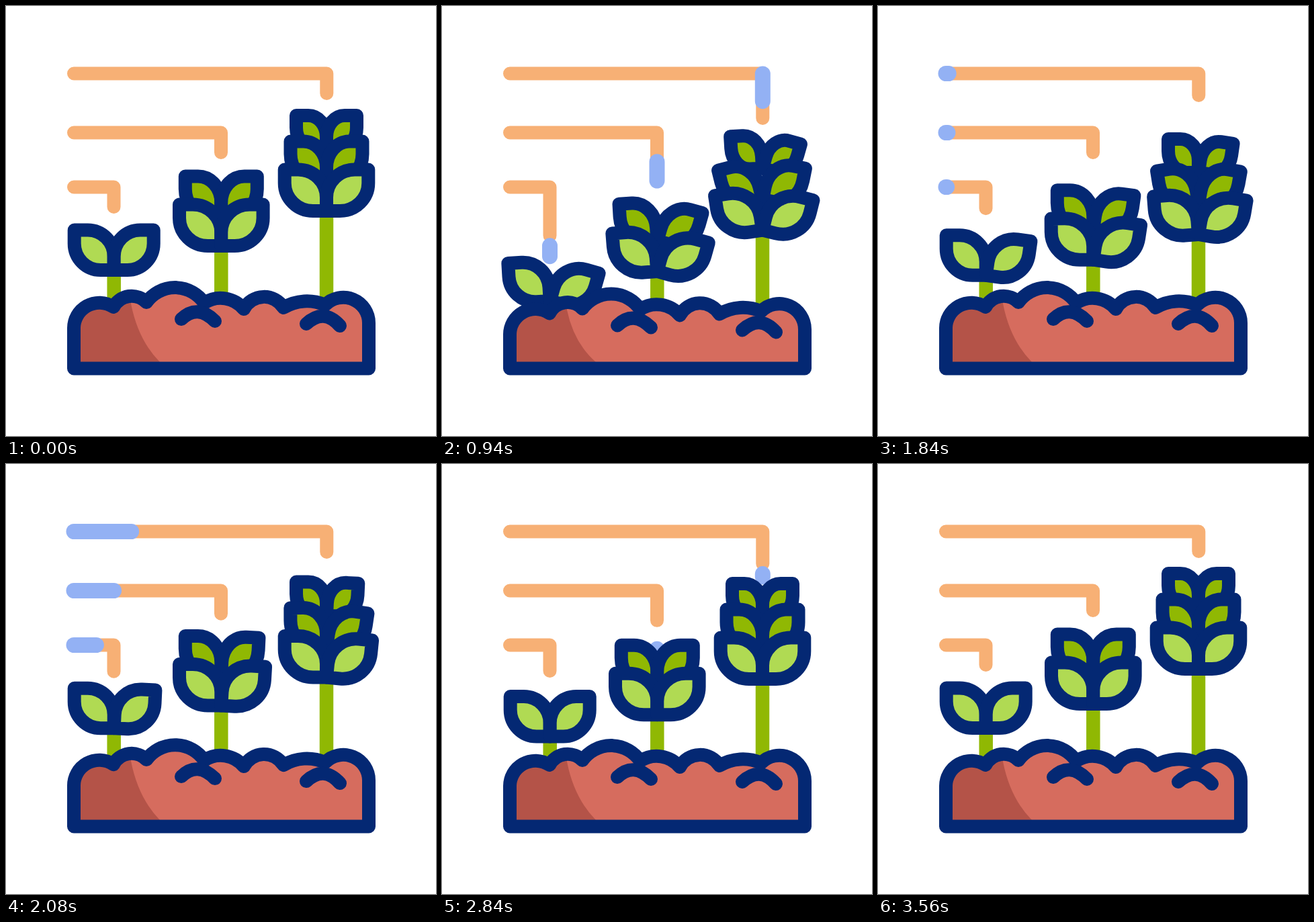
Animation of 640x640 px, one loop 3600 ms. Source, as an HTML page:

```html
<!DOCTYPE html>
<html lang="en">
<head>
<meta charset="utf-8">
<title>Growing plants</title>
<style>
  html, body { margin: 0; width: 100%; height: 100%; overflow: hidden; background: #fff; }
  svg { display: block; width: 640px; height: 640px; }
  path { fill: none; stroke-width: 20; stroke-linecap: round; stroke-linejoin: round; }
  .pipe { stroke: #f7b075; }
  .flow { stroke: #93b1f4; stroke-width: 23; }
  .stem { stroke: #90b803; stroke-width: 20.5; stroke-linecap: butt; }
  .leaf, .line { stroke: #042873; }
  .earth { fill: #d66c5e; }
  .shade { fill: #b45348; }
</style>
</head>
<body>
<svg viewBox="0 0 640 640">
  <g id="pipes"></g>
  <g id="plants"></g>
  <g id="soil"></g>
</svg>
<script>
const LOOP = 3600, LAP = 1750;
const LIGHT = '#b0da53', DARK = '#90b803';

// [time, value] pairs, eased between neighbours
const SINK = [[0, 0], [1220, 53], [2040, 0], [2650, 16.5], [3250, 0]];
const REACH = [[0, 0], [860, 44], [1670, 0], [2480, 19], [3180, 0]];
const LEFT = [[0, 0], [560, -16], [1100, 0], [1580, -9], [1840, 0]];
const RIGHT = [[100, 0], [1000, 16], [1700, 9.5], [2250, 0.7], [2600, 0]];
const PRESS = [[300, 0], [1100, 10.5], [1840, 0], [2360, -2], [2840, 0]];
const HEAD = [[30, 0], [1100, 1]];
const TAIL = [[330, 0], [1140, 1]];

// corner, resting end and length of the flow
const PIPES = [
  { x: 160.5, y: 269.5, end: 299, len: 173, delay: 0 },
  { x: 320, y: 188.5, end: 218, len: 309, delay: 150 },
  { x: 477.3, y: 100.5, end: 130, len: 444, delay: 300 }
];

// layers, back to front: [base y, width, height, flat edge, fill, delay]
const PLANTS = [
  { x: 160.7, delay: 0, layers: [[393, 59, 59.5, 20, LIGHT, 0]] },
  { x: 320.3, delay: 150, layers: [
    [311.5, 53.5, 58, 19, DARK, 0],
    [357, 62.3, 61.5, 20, LIGHT, 30]] },
  { x: 477, delay: 300, layers: [
    [213, 45, 50, 18, DARK, 0],
    [259.5, 53.5, 58, 19, DARK, 260],
    [305, 62.3, 61.5, 20, LIGHT, 130]] }
];

// soil bumps from left to right: [radius, dx, dy]
const BUMPS = [[38, 59, -33], [30.6, 49, -7], [52.5, 86, 1], [45, 59, 9],
  [34, 59, -2], [68, 62, -4], [38, 65, 27]];
const FLOOR = 539.5;

const byId = id => document.getElementById(id);

function add(parent, cls, d = '') {
  const p = document.createElementNS('http://www.w3.org/2000/svg', 'path');
  p.setAttribute('class', cls);
  p.setAttribute('d', d);
  return parent.appendChild(p);
}

function ease(keys, t) {
  if (t <= keys[0][0]) return keys[0][1];
  for (let i = 1; i < keys.length; i++) {
    const [t0, a] = keys[i - 1], [t1, b] = keys[i];
    if (t < t1) {
      const x = (t - t0) / (t1 - t0);
      return a + (b - a) * x * x * (3 - 2 * x);
    }
  }
  return keys[keys.length - 1][1];
}

function leafPath(w, h, f) {
  const arc = `A${w - f} ${h - f} 0 0 1 `;
  return `M${-w} ${-h}H${f - w}${arc}0 ${-f}V0H${-f}${arc}${-w} ${f - h}Z`;
}

for (const p of PIPES) {
  p.line = add(byId('pipes'), 'pipe');
  p.flow = add(byId('pipes'), 'flow', `M101 ${p.y}H${p.x}V${p.y + p.len - (p.x - 101)}`);
}

for (const p of PLANTS) {
  p.stem = add(byId('plants'), 'stem');
  p.leaves = [];
  for (const [y, w, h, flat, fill, delay] of p.layers) {
    for (const side of [1, -1]) {
      const el = add(byId('plants'), 'leaf', leafPath(w, h, flat));
      el.style.fill = fill;
      p.leaves.push({ el, y, side, delay });
    }
  }
  p.base = p.layers[p.layers.length - 1][0];
}

const ridge = BUMPS.map(([r, dx, dy]) => `a${r} ${r} 0 0 1 ${dx} ${dy}`);
const [earth, shade, outline] = ['earth', 'shade', 'line'].map(c => add(byId('soil'), c));
const cracks = add(byId('soil'), 'line', 'M261 466Q285 443 311 469M447 473Q473 449 497 476');

function drawSoil(dy) {
  const left = `M101 ${FLOOR}V${481 + dy}${ridge[0]}`;
  const whole = `${left}${ridge.slice(1).join('')}V${FLOOR}Z`;
  earth.setAttribute('d', whole);
  outline.setAttribute('d', whole);
  shade.setAttribute('d', `${left}a30.6 30.6 0 0 1 26 -15v10Q196.5 ${497 + dy / 2} 229 530V${FLOOR}Z`);
  cracks.setAttribute('transform', `translate(0 ${dy})`);
}

function draw(t) {
  const lap = t < LAP ? t : t - LAP;
  const head = ease(HEAD, lap), tail = ease(TAIL, lap);
  const flowing = head > tail;

  for (const p of PIPES) {
    p.line.setAttribute('d', `M101 ${p.y}H${p.x}V${p.end + ease(REACH, t - p.delay)}`);
    p.flow.style.visibility = flowing ? 'visible' : 'hidden';
    if (flowing) {
      p.flow.setAttribute('stroke-dasharray', `${(head - tail) * p.len} 2000`);
      p.flow.setAttribute('stroke-dashoffset', -tail * p.len);
    }
  }

  for (const p of PLANTS) {
    const dy = ease(SINK, t - p.delay);
    p.stem.setAttribute('d', `M${p.x} ${p.base + dy}V455`);
    for (const { el, y, side, delay } of p.leaves) {
      const turn = ease(side > 0 ? LEFT : RIGHT, t - delay);
      el.setAttribute('transform', `translate(${p.x} ${y + dy}) rotate(${turn}) scale(${side} 1)`);
    }
  }

  drawSoil(ease(PRESS, t));
}

const start = performance.now();
function tick() {
  draw((performance.now() - start) % LOOP);
  requestAnimationFrame(tick);
}
tick();
</script>
</body>
</html>
```
